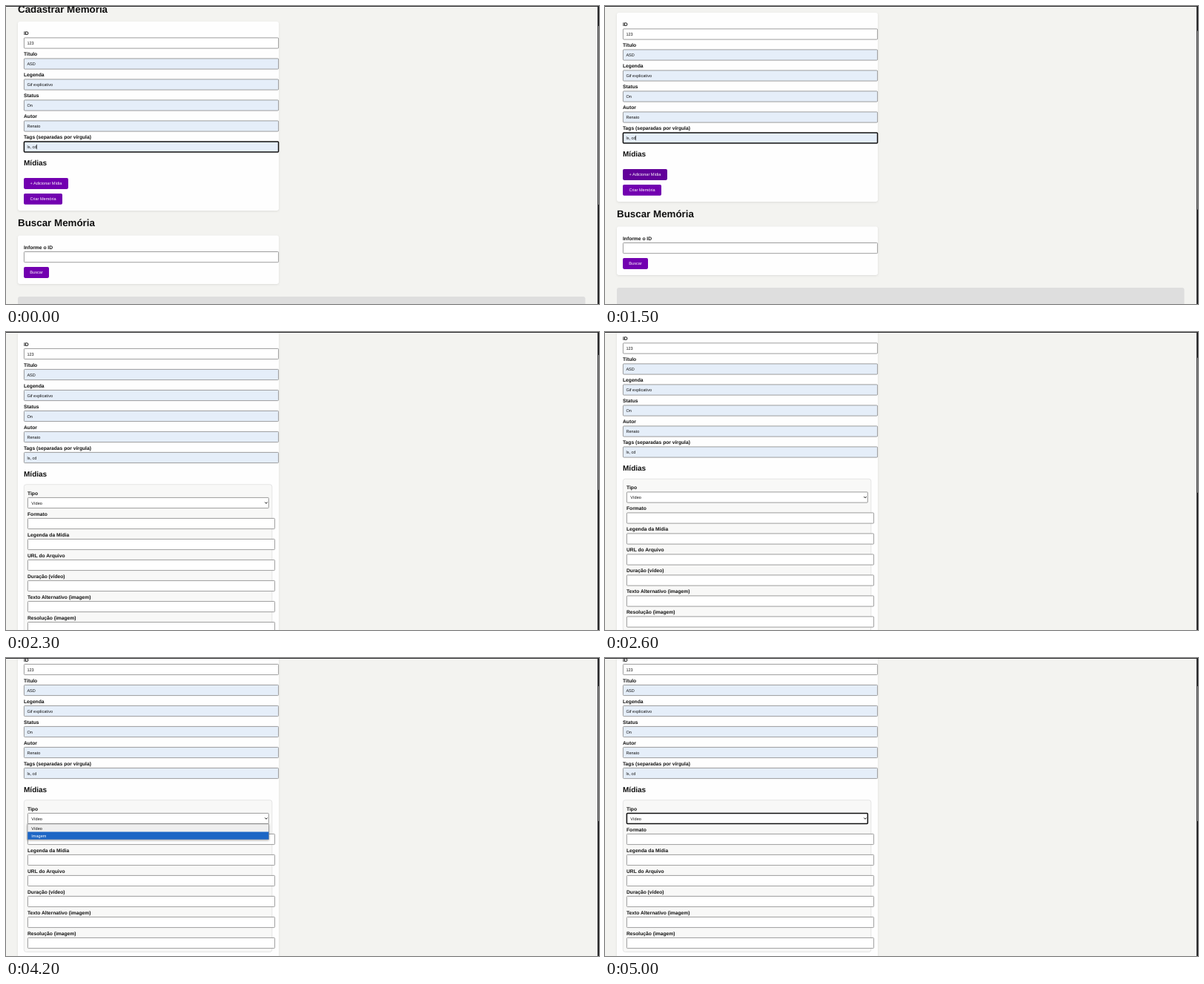
Recreate the animation shown at these times as an HTML page. Size 800 px wide and 402 px high, loop 5.1 s.

```html
<!DOCTYPE html>
<html lang="pt">
<head>
<meta charset="utf-8">
<title>Cadastrar Memória</title>
<style>
html, body { margin: 0; width: 100%; height: 100%; overflow: hidden; background: #f3f3f0; }
svg { display: block; width: 100vw; height: 100vh; font: 5.57px "Liberation Sans", Arial, sans-serif; }
text { fill: #111; text-rendering: geometricPrecision; }
.label { font-size: 6.69px; font-weight: bold; }
.h1 { font-size: 13.37px; font-weight: bold; }
.h2 { font-size: 10.03px; font-weight: bold; }
.card { fill: #fefefe; filter: drop-shadow(0 1px 1.5px rgba(0, 0, 0, .09)); }
.box { fill: #fff; stroke: #858585; stroke-width: .8; }
.filled { fill: #e5eef9; }
.focus { stroke: #101010; stroke-width: 1.5; }
.btn { fill: #7200b0; }
.light { fill: #fff; }
.mid { text-anchor: middle; }
</style>
</head>
<body>
<svg viewBox="0 0 800 402">
  <g id="page"></g>
  <rect width="800" height="1" fill="#2a2a2c"/>
  <rect x="798" width="2" height="402" fill="#29292b"/>
  <rect id="thumb" x="799" width="1" fill="#9b9b9b"/>
</svg>
<script>
const LOOP = 5100;
const $ = id => document.getElementById(id);

const rect = (x, y, w, h, cls, r = 1, extra = '') =>
  `<rect x="${x}" y="${y}" width="${w}" height="${h}" rx="${r}" class="${cls}" ${extra}/>`;
const text = (x, y, s, cls = '') => `<text x="${x}" y="${y}" class="${cls}">${s}</text>`;

// A label with its input; y is the centre of the input.
const field = (x, y, w, label, value = '', cls = '', id = '') =>
  text(x, y - 10.6, label, 'label') +
  rect(x + .4, y - 7.1, w - .8, 14.2, 'box ' + cls, 1, id && `id="${id}"`) +
  text(x + 4.4, y + 2, value);

const button = (y, w, label, id = '') =>
  rect(24, y - 7.4, w, 14.8, 'btn', 1.8, id && `id="${id}"`) +
  text(24 + w / 2, y + 1.9, label, 'light mid');

const memory = [['ID', '123'], ['Título', 'ASD'], ['Legenda', 'Gif explicativo'],
  ['Status', 'On'], ['Autor', 'Renato'], ['Tags (separadas por vírgula)', 'ls, cd']];
const media = ['Formato', 'Legenda da Mídia', 'URL do Arquivo', 'Duração (vídeo)',
  'Texto Alternativo (imagem)', 'Resolução (imagem)'];

$('page').innerHTML =
  text(16, 8.6, 'Cadastrar Memória', 'h1') +
  rect(16, 21, 352, 255, 'card', 3, 'id="card"') +
  memory.map(([label, value], i) =>
    field(24, 50 + 28 * i, 344, label, value, i ? 'filled' : '', i == 5 ? 'tags' : '')).join('') +
  rect(41.3, 186.8, .6, 6.4, '', 0, 'id="caret"') +
  text(24, 215.1, 'Mídias', 'h2') +
  '<g id="before">' +
    button(239.5, 60, '+ Adicionar Mídia', 'add') +
    button(260.4, 52, 'Criar Memória') +
    text(16, 297.3, 'Buscar Memória', 'h1') +
    rect(16, 309.5, 352, 65.5, 'card', 3) +
    field(24, 338.6, 344, 'Informe o ID') +
    button(359.5, 34, 'Buscar') +
    rect(16, 392, 765.5, 60, '', 3, 'fill="#dedede"') +
  '</g><g id="after">' +
    rect(24.3, 226.2, 334.6, 204.8, '', 3, 'fill="#f8f8f7" stroke="#dcdcdc" stroke-width=".7"') +
    field(29, 251, 325.8, 'Tipo', '', '', 'type') +
    text(34.3, 253, 'Vídeo') +
    '<path d="M349.3 250l1.7 1.8 1.7-1.8" fill="none" stroke="#111" stroke-width="1"/>' +
    media.map((label, i) => field(29, 279 + 28 * i, 334, label)).join('') +
    '<g id="popup">' +
      rect(29, 258.4, 325.6, 20.9, '', 0,
        'fill="#efefef" stroke="#777" stroke-width=".6" style="filter:drop-shadow(0 1px 1.5px #0005)"') +
      rect(29.2, 0, 325.2, 10.2, '', 0, 'id="pick" fill="#1d66c5"') +
      text(34.3, 266, 'Vídeo') + text(34.3, 276.2, 'Imagem') +
    '</g></g>';

const options = document.querySelectorAll('#popup text');

// [time, scroll offset]
const scrolls = [[0, 0], [800, .5], [900, 1.8], [1000, 8], [1100, 12],
  [2300, 20.5], [2500, 23], [2600, 28], [2700, 33], [2800, 34.5]];

const show = (id, on) => $(id).style.display = on ? '' : 'none';

function draw() {
  const t = performance.now() % LOOP;
  const within = (a, b) => t >= a && t < b;
  const scroll = scrolls.findLast(s => t >= s[0])[1];
  const added = t >= 1800;
  const open = within(3000, 3200) || within(3700, 4300);
  const image = within(3900, 4300);

  $('page').setAttribute('transform', `translate(0 ${-scroll})`);
  $('card').setAttribute('height', added ? 470 : 255);
  show('before', !added);
  show('after', added);
  show('caret', t < 500 || within(1000, 1600));
  $('tags').classList.toggle('focus', !added);
  $('add').style.fill = t >= 1500 ? '#62009a' : '';

  show('popup', open);
  $('type').classList.toggle('focus', t >= 3200 && !open);
  $('pick').setAttribute('y', image ? 269 : 258.8);
  options.forEach((o, i) => o.classList.toggle('light', i == image));

  $('thumb').setAttribute('y', added ? 20.8 + scroll / 2 : 27 + scroll * .55);
  $('thumb').setAttribute('height', added ? 182 : 241);
  requestAnimationFrame(draw);
}
draw();
</script>
</body>
</html>
```
